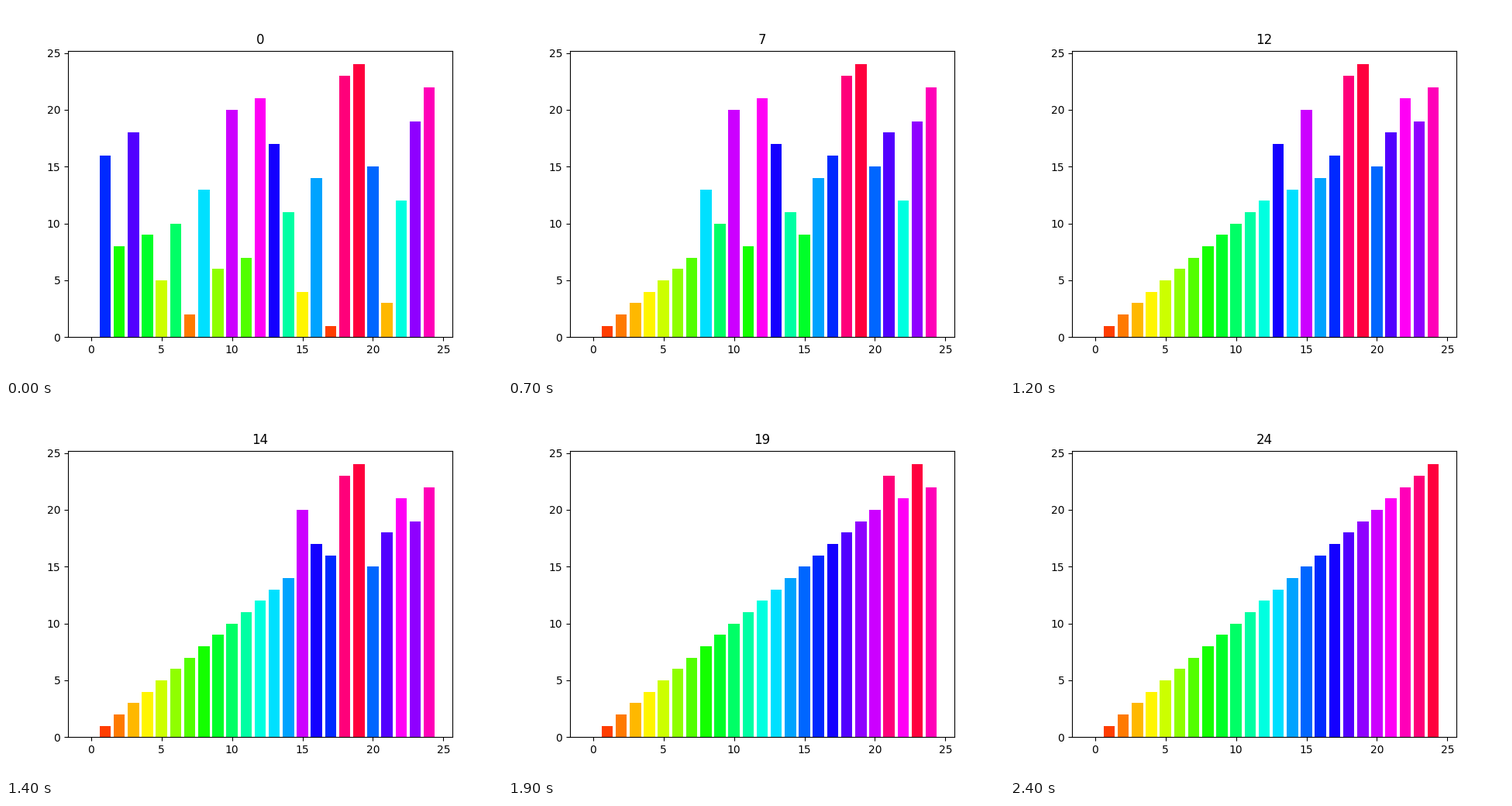
A matplotlib script for the animation above (2.5 s loop, 640x480 px).

```python
import colorsys

import matplotlib.pyplot as plt
from matplotlib.animation import FuncAnimation

START = [0, 16, 8, 18, 9, 5, 10, 2, 13, 6, 20, 7, 21,
         17, 11, 4, 14, 1, 23, 24, 15, 3, 12, 19, 22]
N = len(START)
STEP_MS = 100


def selection_sort(values):
    """Yield the list after each swap into its sorted place."""
    values = list(values)
    for i in range(len(values)):
        j = values.index(min(values[i:]))
        values[i], values[j] = values[j], values[i]
        yield list(values)


def hue(value):
    return colorsys.hsv_to_rgb(value / N, 1, 1)


states = list(selection_sort(START))

fig, ax = plt.subplots(figsize=(6.4, 4.8), dpi=100)
bars = ax.bar(range(N), states[0])
title = ax.set_title("0")


def draw(step):
    for bar, value in zip(bars, states[step]):
        bar.set_height(value)
        bar.set_facecolor(hue(value))
    title.set_text(str(step))
    return [*bars, title]


anim = FuncAnimation(fig, draw, frames=N, interval=STEP_MS,
                     repeat=True, repeat_delay=0, blit=False)
plt.show()
```
